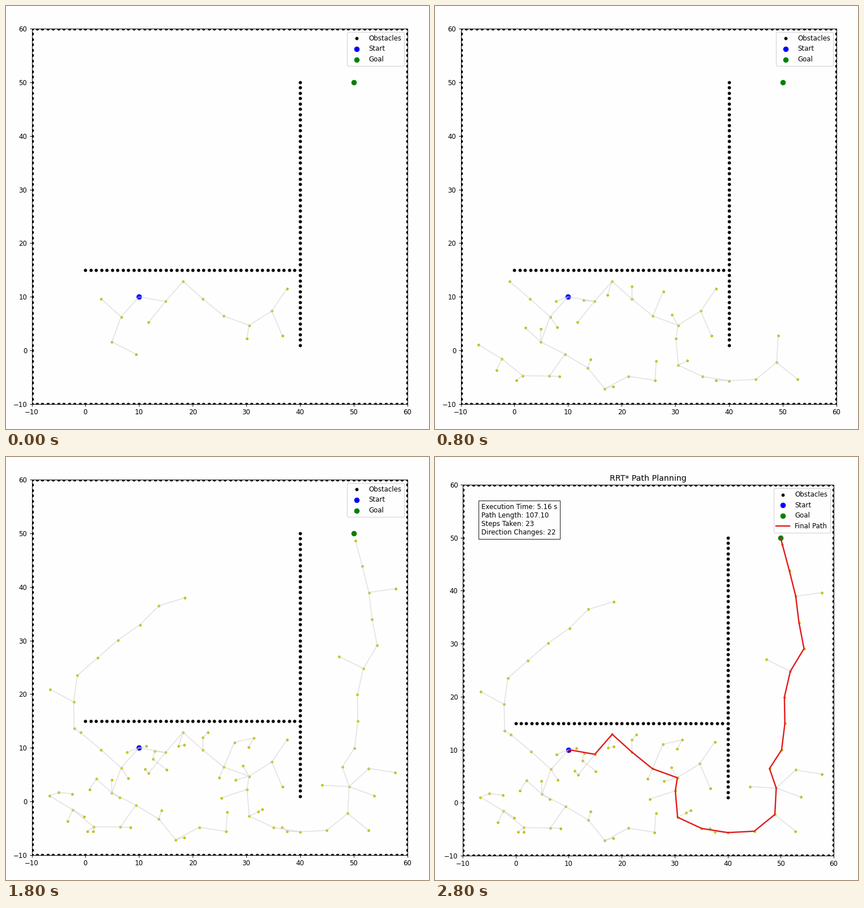
A matplotlib script for the animation above (2.9 s loop, 748 px wide and 748 px high).

```python
import random

import numpy as np
import matplotlib.pyplot as plt
from matplotlib.animation import FuncAnimation
from matplotlib.collections import LineCollection

STAGE, DPI = 748, 85
FRAMES, INTERVAL = 29, 100
FINISH = 24      # first step that shows the finished plan
LAST_GROWTH = 17
REACH = 5        # longest edge of the tree
PAPER = "#fefefe"
START, GOAL = 10 + 10j, 50 + 50j

spots, parents, born = [START], [0], [0]


def add(spot, parent, when):
    spots.append(spot)
    parents.append(parent)
    born.append(when)
    return len(spots) - 1


def grow(parent, headings, start, stop=None, reach=REACH):
    """Walk from a node along headings in degrees; return the new nodes."""
    times = np.linspace(start, start if stop is None else stop, len(headings))
    chain = []
    for when, heading in zip(times, headings):
        parent = add(spots[parent] + reach * np.exp(1j * np.radians(heading)),
                     parent, when)
        chain.append(parent)
    return chain


def grow_route():
    """The branch that reaches the goal, with its side shoots."""
    west = grow(0, [-10, 49, -42, -39, -20], 0)
    bend, = grow(west[-1], [-99], 0, reach=2.5)
    south = grow(bend, [-85, -25, -9, 3, 39, 87], 1, 7)
    gap, = grow(south[-1], [109], 9, reach=3.9)
    gate, = grow(gap, [57], 11, reach=4.2)
    east = grow(gate, [83, 91, 77, 59, 101, 97, 104, 105], 12, 17)

    grow(west[0], [231], 0)
    grow(west[3], [67], 3)
    fork, = grow(west[-1], [32], 0)
    for heading in (56, -67):
        grow(fork, [heading], 0)
    grow(bend, [198], 11)
    grow(south[4], [-39], 8)
    grow(south[5], [43, -9], 10, 16)
    grow(south[5], [-20], 10)
    grow(south[5], [177], 11)
    grow(east[2], [154], 15)
    grow(east[5], [8], 17)
    return east[-1]


def grow_left():
    """The branches left of the start: one upwards, two along the bottom."""
    hub, = grow(0, [228], 0)
    rise = grow(hub, [138, 140], 0, 2)
    corner, = grow(rise[-1], [149], 9, reach=1.4)
    upper = grow(corner, [91, 82, 41, 41, 35, 45, 17], 11, 17)
    grow(upper[0], [152], 14)

    low = grow(hub, [250, -27], 0)
    grow(low[-1], [235, 179, 141, 149], 1, 5)
    grow(low[-1], [-31, -51, 28, -9], 1, 8)


def grow_twigs(rng, per_step=2):
    """Short random shoots from the nearest node below the shelf."""
    for step in range(1, LAST_GROWTH + 1):
        made = 0
        while made < per_step:
            spot = complex(rng.uniform(-6, 38.5), rng.uniform(-8, 13))
            gap, near = min((abs(spot - spots[i]), i)
                            for i in range(len(spots)) if born[i] <= step)
            if 0.8 < gap < 0.8 * REACH:
                add(spot, near, step)
                made += 1


def xy(values):
    values = np.asarray(values)
    return np.stack([values.real, values.imag], axis=-1)


def final_path(node):
    path = [GOAL, spots[node]]
    while node:
        node = parents[node]
        path.append(spots[node])
    return xy(path)


def obstacles():
    side = np.arange(-10, 61)
    border = [side + 1j * edge for edge in (-10, 60)]
    border += [edge + 1j * side for edge in (-10, 60)]
    shelf, wall = np.arange(40) + 15j, 40 + 1j * np.arange(1, 51)
    return xy(np.concatenate(border + [shelf, wall]))


tip = grow_route()
grow_left()
grow_twigs(random.Random(7))
points, births = xy(spots), np.array(born)
edges = np.stack([points, points[parents]], axis=1)


def make_axes(left, bottom, size):
    ax = fig.add_axes([v / STAGE for v in (left, bottom, size, size)])
    ax.set(xlim=(-10, 60), ylim=(-10, 60), facecolor=PAPER)
    ax.scatter(*obstacles().T, s=15, color="black", label="Obstacles")
    ax.scatter(*xy(START), s=50, color="blue", label="Start")
    ax.scatter(*xy(GOAL), s=50, color="green", label="Goal")
    dots, = ax.plot([], [], "yo", ms=3)
    lines = LineCollection([], colors="lightgray", alpha=0.6,
                           linewidths=1.5, zorder=2)
    ax.add_collection(lines, autolim=False)
    return ax, dots, lines


def show_tree(dots, lines, step):
    alive = births <= step
    alive[0] = False  # the start has its own marker
    dots.set_data(points[alive].T)
    lines.set_segments(edges[alive])


plt.rcParams["font.family"] = "DejaVu Sans"
fig = plt.figure(figsize=(STAGE / DPI, STAGE / DPI), dpi=DPI, facecolor=PAPER)

search, search_dots, search_lines = make_axes(45.5, 44, 664.1)
search.legend(loc="upper right")

result, result_dots, result_lines = make_axes(49, 43, 656)
show_tree(result_dots, result_lines, FINISH)
result.plot(*final_path(tip).T, color="#e3191b", lw=2, label="Final Path")
result.set_title("RRT* Path Planning")
result.text(0.05, 0.95,
            "Execution Time: 5.16 s\nPath Length: 107.10\n"
            "Steps Taken: 23\nDirection Changes: 22",
            transform=result.transAxes, va="top",
            bbox=dict(facecolor="white", alpha=0.8))
result.legend(loc="upper right")


def update(step):
    done = step >= FINISH
    search.set_visible(not done)
    result.set_visible(done)
    show_tree(search_dots, search_lines, step)
    return search, result


anim = FuncAnimation(fig, update, frames=FRAMES, interval=INTERVAL,
                     repeat=True, repeat_delay=0, blit=False)
plt.show()
```
